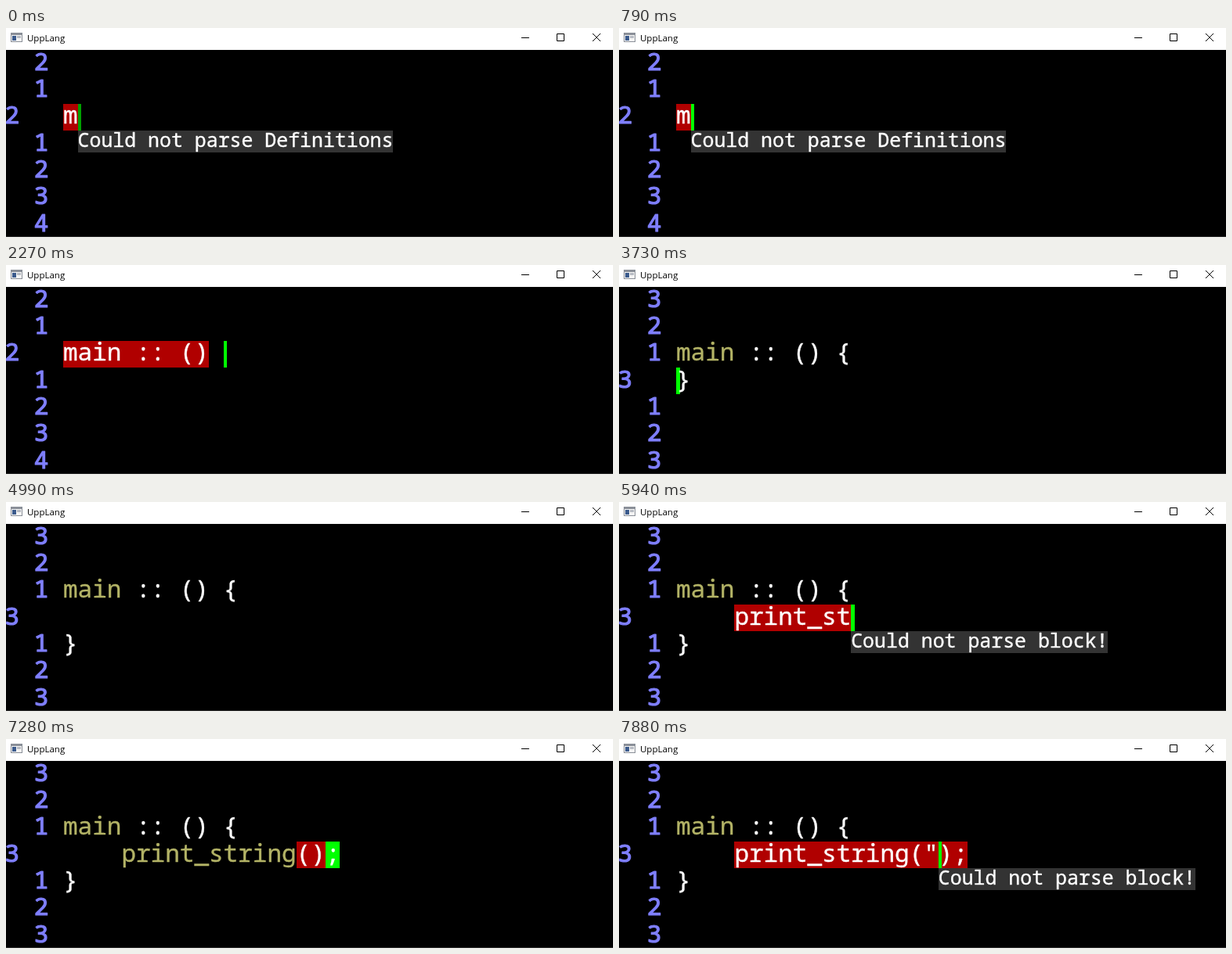
Recreate the animation shown at these times as an HTML page with a canvas. Size 775 by 267 pixels, loop 8000 ms.

```html
<!DOCTYPE html>
<html lang="en">
<head>
<meta charset="utf-8">
<title>UppLang</title>
<style>
html, body { margin: 0; width: 100%; height: 100%; overflow: hidden; background: #000; }
canvas { display: block; width: 775px; height: 267px; }
</style>
</head>
<body>
<canvas id="stage"></canvas>
<script>
const W = 775, H = 267, LOOP = 8000;
const CELL = 18.6, LEFT = 73, TOP = 28.2, ROW = 34.3;
const HINT_CELL = 14.92, HINT_ROW = 27.6;
const MONO = '"Noto Sans Mono", "DejaVu Sans Mono", monospace';
const WHITE = '#fff', RED = '#b00000', GREEN = '#00ff00', NUMBER = '#7f7fff', NAME = '#b3b366', GREY = '#333';

const canvas = document.getElementById('stage');
const ctx = canvas.getContext('2d');
const dpr = window.devicePixelRatio || 1;
canvas.width = W * dpr;
canvas.height = H * dpr;
ctx.scale(dpr, dpr);

// Each step: start time, text of the edited line, then optional state.
const steps = [];
const add = (time, text, state = {}) =>
  steps.push({ time, text, indent: 0, cursor: text.length, ...state });

const headError = { error: ['Could not parse Definitions'] };
[
  [0, 'm'], [190, 'mi'], [320, 'mia'], [650, 'mi'], [790, 'm'],
  [890, 'ma'], [990, 'mai'], [1090, 'main'], [1190, 'main '],
  [1390, 'main :'], [1590, 'main ::'], [1650, 'main :: '],
  [1920, 'main :: ('], [2140, 'main :: ()'], [2270, 'main :: () ']
].forEach(([time, text]) => add(time, text, { ...headError, dim: time === 0 }));
add(2730, 'main :: () {', { name: 4 });

add(2990, '', { body: true, indent: 4 });
add(3260, '}', { body: true });
add(3730, '}', { body: true, cursor: 0 });

const block = { body: true, closed: true, indent: 4 };
const blockError = { ...block, error: ['Could not parse block!'] };
add(3930, '', block);
add(4990, '', { ...block, cursor: -1 });

const call = 'print_string()';
[5120, 5220, 5320, 5420, 5520, 5670, 5870, 5940, 6140, 6230, 6320, 6410, 6680, 6810]
  .forEach((time, i) => add(time, call.slice(0, i + 1), blockError));

const valid = { ...block, name: 12, mark: [12, 14] };
const argHint = ['Argument count does not match', 'Expected: 1', 'Given: 0'];
add(7140, call + ';', valid);
add(7280, call + ';', { ...valid, cursor: 14, wide: true });
add(7410, call + ';', { ...valid, cursor: 13, wide: true, hint: argHint });
add(7610, call + ';', { ...valid, cursor: 13, hint: argHint });
add(7880, 'print_string(");', { ...blockError, cursor: 14 });

const colX = col => LEFT + col * CELL;
const rowY = row => TOP + row * ROW;

function box(x, y, w, h, color) {
  const x0 = Math.round(x), y0 = Math.round(y);
  ctx.fillStyle = color;
  ctx.fillRect(x0, y0, Math.round(x + w) - x0, Math.round(y + h) - y0);
}

function mono(text, x, baseline, cell, size, color, heft) {
  ctx.font = `${size}px ${MONO}`;
  ctx.fillStyle = ctx.strokeStyle = color;
  ctx.lineWidth = heft;
  ctx.lineJoin = 'round';
  [...text].forEach((ch, i) => {
    ctx.fillText(ch, x + i * cell, baseline);
    ctx.strokeText(ch, x + i * cell, baseline);
  });
}

function code(text, col, row, color = WHITE, heft = 0.4) {
  mono(text, colX(col), rowY(row) + 25.6, CELL, 31, color, heft);
}

function named(text, col, row, count = 0) {
  code(text.slice(0, count), col, row, NAME);
  code(text.slice(count), col + count, row);
}

function hint(lines, col, row) {
  const x = colX(col), y = rowY(row);
  const width = Math.max(...lines.map(s => s.length)) * HINT_CELL;
  box(x, y, width, lines.length * HINT_ROW, GREY);
  lines.forEach((s, i) => mono(s, x, y + 20.7 + i * HINT_ROW, HINT_CELL, 24.87, WHITE, 0.4));
}

function titleBar() {
  box(0, 0, W, 28, WHITE);
  box(6, 6, 15, 12, '#8a8f98');
  box(7, 9, 13, 8, '#f4f4f4');
  box(8, 10, 5, 6, '#3b5a8c');
  box(14, 10, 5, 3, '#b8bcc4');
  ctx.font = '11.5px "Open Sans", "Noto Sans", sans-serif';
  ctx.fillStyle = '#000';
  ctx.fillText('UppLang', 27, 17);
  ctx.strokeStyle = '#000';
  ctx.lineWidth = 1;
  ctx.strokeRect(703.5, 7.5, 9, 9);
  ctx.beginPath();
  ctx.moveTo(658, 12.5); ctx.lineTo(668, 12.5);
  ctx.moveTo(749, 7); ctx.lineTo(759, 17);
  ctx.moveTo(759, 7); ctx.lineTo(749, 17);
  ctx.stroke();
}

function lineNumbers(active) {
  for (let row = 0; row < 7; row++) {
    const here = row === active;
    code(String(here ? active : Math.abs(row - active)), here ? -4 : -2, row, NUMBER, 1.2);
  }
}

function draw(s) {
  const row = s.body ? 3 : 2;
  const at = s.indent + s.cursor;
  const used = s.text.trimEnd().length;
  const mark = s.error ? [0, used] : s.mark;

  box(0, 0, W, H, '#000');
  box(0, 266, W, 1, '#2a2a2a');
  titleBar();
  lineNumbers(row);
  if (s.body) named('main :: () {', 0, 2, 4);
  if (s.closed) code('}', 0, 4);

  if (mark) box(colX(s.indent + mark[0]), rowY(row), (mark[1] - mark[0]) * CELL, ROW, RED);
  if (s.cursor >= 0) {
    box(colX(at), rowY(row), s.wide ? CELL : CELL / 4, ROW, s.dim ? '#00a000' : GREEN);
  }
  named(s.text, s.indent, row, s.name);

  const lines = s.hint || (s.cursor <= used && s.error);
  if (lines) hint(lines, at, row + 1);
}

const start = performance.now();
function frame() {
  const t = (performance.now() - start) % LOOP;
  draw(steps.findLast(s => s.time <= t) || steps[0]);
  requestAnimationFrame(frame);
}
frame();
</script>
</body>
</html>
```
